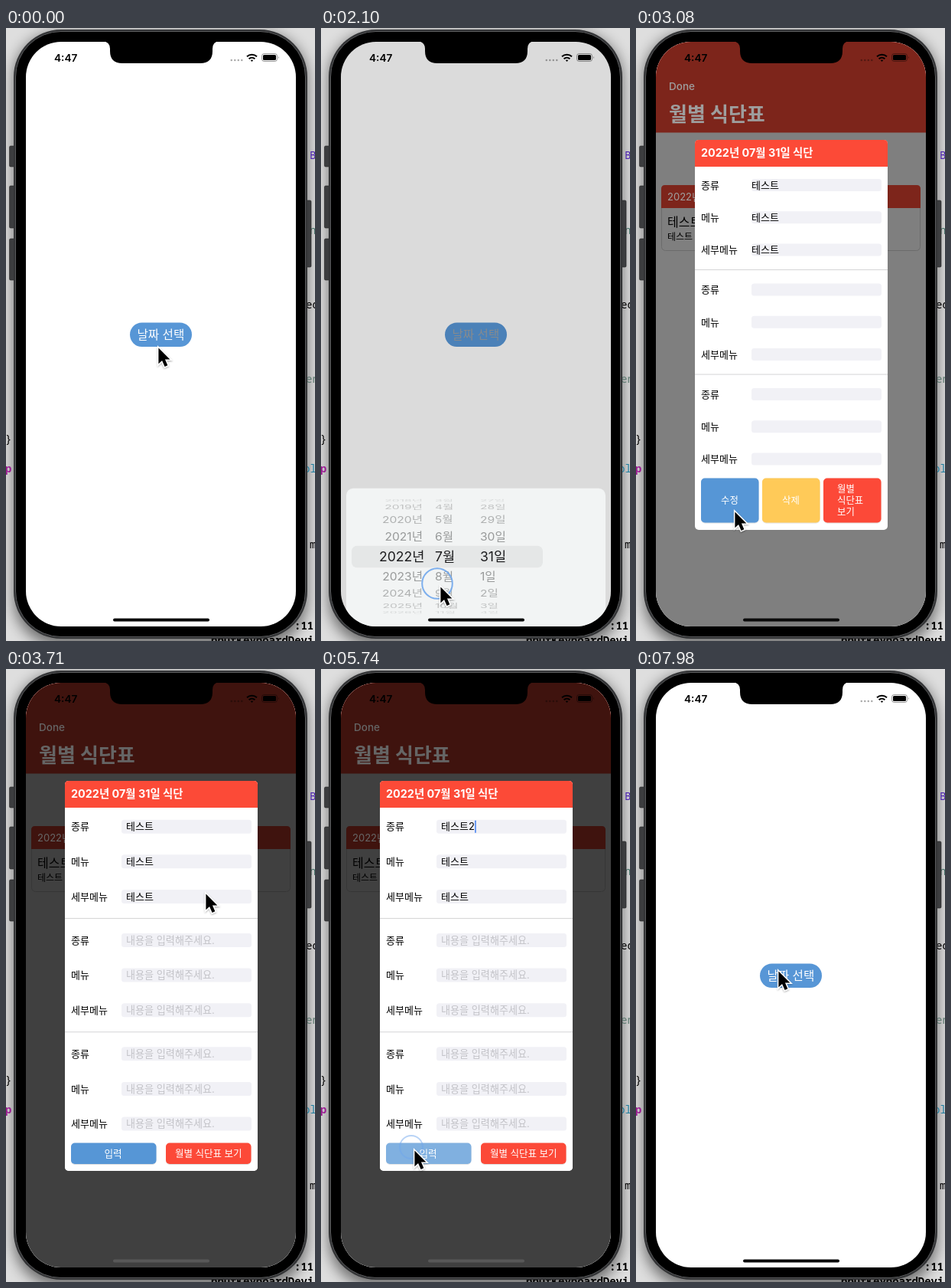
Recreate the animation shown at these times as an HTML page. Size 404 by 800 pixels, loop 8 s.

```html
<!DOCTYPE html>
<html lang="ko">
<head>
<meta charset="utf-8">
<style>
html, body { margin: 0; width: 100%; height: 100%; overflow: hidden; background: #dedede; }
svg { display: block; width: 404px; height: 800px; }
text { font-family: Inter, "Noto Sans CJK KR", "Noto Sans CJK JP", sans-serif; white-space: pre; }
.code text { font-family: "Noto Sans Mono", "DejaVu Sans Mono", monospace; font-size: 14px; }
.bold { font-weight: 700; }
.medium { font-weight: 500; }
.white { fill: #fff; }
.red { fill: #fc4a37; }
.blue { fill: #5796d6; }
.yellow { fill: #ffca58; }
.field { fill: #f1f1f6; }
.hint { fill: #c3c3c8; }
</style>
</head>
<body>
<svg viewBox="0 0 404 800">
  <defs>
    <filter id="blur" x="-20%" y="-20%" width="140%" height="140%"><feGaussianBlur stdDeviation="9"/></filter>
    <filter id="soft" x="-50%" y="-50%" width="200%" height="200%"><feDropShadow dx="0" dy="1.2" stdDeviation="1" flood-opacity=".35"/></filter>
    <filter id="lift" x="-10%" y="-20%" width="120%" height="140%"><feDropShadow dx="0" dy=".5" stdDeviation=".7" flood-opacity=".25"/></filter>
    <clipPath id="screenClip"><rect x="26" y="18" width="353" height="763" rx="46"/></clipPath>
  </defs>

  <rect width="404" height="800" fill="#dedede"/>
  <rect x="10" y="6" width="384" height="800" rx="60" fill="#000" opacity=".5" filter="url(#blur)"/>
  <g class="code">
    <text x="397" y="171" fill="#4b21b0">B</text>
    <text x="397" y="269" fill="#3f6e63">n</text>
    <text x="392" y="366">ed</text>
    <text x="392" y="463" fill="#5d7a70">en</text>
    <text x="389" y="580" fill="#1f7fa0">ol</text>
    <text x="397" y="679">m</text>
    <text x="-1" y="541">}</text>
    <text x="-1" y="580" class="bold" fill="#9b1f94">p:</text>
    <text x="377" y="785" class="bold">:11</text>
    <text x="268" y="804" class="bold">nputKeyboardDevi</text>
  </g>

  <g fill="#3c3d3f" stroke="#222" stroke-width=".6">
    <rect x="4.5" y="154" width="8" height="27" rx="1.5"/>
    <rect x="4.5" y="206" width="8" height="55" rx="1.5"/>
    <rect x="4.5" y="275" width="8" height="54" rx="1.5"/>
    <rect x="391" y="225" width="8" height="87" rx="1.5"/>
  </g>
  <rect x="10" y="2" width="384" height="795" rx="62" fill="#333436"/>
  <rect x="12.5" y="4.5" width="379" height="790" rx="59.5" fill="#000" stroke="#5a5b5d"/>

  <g clip-path="url(#screenClip)">
    <rect x="26" y="18" width="353" height="763" fill="#fff"/>
    <rect id="pick" x="162" y="384.5" width="81" height="31.5" rx="15.7"/>
    <text id="pickText" x="171.5" y="406" font-size="15.6">날짜 선택</text>
    <rect id="sheetDim" x="26" y="18" width="353" height="763"/>
    <g id="sheet"></g>
    <g id="page">
      <rect x="26" y="18" width="353" height="763" fill="#fff"/>
      <rect class="red" x="26" y="18" width="353" height="118.5"/>
      <rect x="33.5" y="205.5" width="338" height="85" rx="5" fill="#fff" stroke="#d8d8d8"/>
      <path class="red" d="M33 235V210q0-5 5-5H367q5 0 5 5V235Z"/>
      <text class="medium" x="41" y="259" font-size="16" id="cellTitle"></text>
      <text x="41" y="277" font-size="12">테스트</text>
    </g>
    <rect id="dim" x="26" y="18" width="353" height="763"/>
    <g id="titles">
      <text class="white medium" x="43" y="80.5" font-size="13.5">Done</text>
      <text class="white bold" x="43" y="122" font-size="26">월별 식단표</text>
      <text class="white" x="41" y="225" font-size="13">2022년 07월 31일</text>
    </g>

    <text x="63" y="43.5" font-size="13.6" font-weight="600">4:47</text>
    <g opacity=".33">
      <circle cx="294.8" cy="42" r="1.3"/><circle cx="299.3" cy="42" r="1.3"/>
      <circle cx="303.8" cy="42" r="1.3"/><circle cx="308.3" cy="42" r="1.3"/>
    </g>
    <g fill="none" stroke="#000" stroke-width="2">
      <path d="M315 37.2a9.5 9.5 0 0 1 13 0M317.6 40.2a5.7 5.7 0 0 1 7.8 0"/>
      <path d="M319.8 42 321.5 44 323.2 42Q321.5 40.8 319.8 42Z" fill="#000" stroke="none"/>
    </g>
    <rect x="334.5" y="33.5" width="20" height="10" rx="3" fill="none" stroke="#000" opacity=".4"/>
    <rect x="336" y="35" width="17" height="7" rx="1.6"/>
    <path d="M356 36.8q1.6 1.7 0 3.4Z" opacity=".5"/>
    <g id="detail"></g>
    <g id="edit"></g>
    <rect id="home" x="140" y="770.5" width="126" height="4" rx="2"/>
  </g>
  <path d="M126 17H279Q270 18 270 27V30Q270 46 254 46H152Q136 46 136 30V27Q136 18 126 17Z"/>

  <circle id="tap" fill="none" stroke="#6fa6ec" stroke-width="2"/>
  <g id="cursor">
    <path transform="translate(1.4 2.6) scale(.88)" d="M0 0V23.5L5.3 18.6 9.3 27.6 13.6 25.7 9.7 17H17Z" stroke="#fff" stroke-width="3.4" paint-order="stroke" filter="url(#soft)"/>
  </g>
</svg>

<script>
const LOOP = 8000, STEP = 70;
const el = id => document.getElementById(id);
const set = (id, attrs) => { for (const k in attrs) el(id).setAttribute(k, attrs[k]); };
const clamp = x => Math.min(1, Math.max(0, x));
const smooth = x => x * x * (3 - 2 * x);
const easeOut = x => 1 - (1 - x) ** 3;
const ramp = (t, from, to) => clamp((t - from) / (to - from));
const pulse = (t, a, b, c, d) => smooth(ramp(t, a, b)) * (1 - smooth(ramp(t, c, d)));
const mix = (a, b, p) => a + (b - a) * p;
const mixColor = (a, b, p) => `rgb(${a.map((v, i) => Math.round(mix(v, b[i], p)))})`;

const text = (x, y, size, s, attrs = '') => `<text x="${x}" y="${y}" font-size="${size}" ${attrs}>${s}</text>`;
const box = (x, y, w, h, r, attrs) => `<rect x="${x}" y="${y}" width="${w}" height="${h}" rx="${r}" ${attrs}/>`;

function buildWheel() {
  const offsets = [0, 26, 48, 64.5, 73], grays = ['#1c1c1e', '#989a9a', '#aeb0b0', '#c0c2c2', '#d6d8d8'];
  let out = box(33, 593, 339, 240, 9, 'fill="#f2f4f4"') + box(40, 668, 250, 28.5, 7, 'fill="#e5e7e7"');
  for (let i = -4; i <= 4; i++) {
    const n = Math.abs(i), size = n ? 15.6 : 17.6;
    const squash = Math.cos(n * Math.PI / 9.2);
    const y = 682.3 + Math.sign(i) * offsets[n], base = size * .36;
    const day = i > 0 ? i : 31 + i;
    out += `<g transform="translate(0 ${y}) scale(1 ${squash})" fill="${grays[n]}">`
      + text(n ? 133 : 135.5, base, size, `${2022 + i}년`, 'text-anchor="end"')
      + text(149, base, size, `${7 + i}월`) + text(208, base, size, `${day}일`) + '</g>';
  }
  return out;
}

function buildPopup({ first, row, group, fieldH, textX, hint, name }) {
  let out = box(77, 146, 252, 509, 5, 'fill="#fff"')
    + '<path class="red" d="M77 181V151q0-5 5-5H324q5 0 5 5V181Z"/>'
    + text(85, 168, 14.4, '2022년 07월 31일 식단', 'class="white bold"');
  for (let g = 0; g < 3; g++) {
    ['종류', '메뉴', '세부메뉴'].forEach((label, i) => {
      const y = first + g * group + i * row;
      out += text(85, y + 4.7, 13, label, 'class="medium"')
        + box(151, y - fieldH / 2, 170, fieldH, 3.5, 'class="field"');
      if (!g) out += text(textX, y + 4.7, 13, '테스트', i ? '' : `id="${name}"`);
      else if (hint) out += text(textX, y + 4.7, 13.1, hint, 'class="hint"');
    });
    if (g < 2) out += box(77, first + g * group + row * 2 + (group - row * 2) / 2 - .5, 252, 1, 0, 'fill="#d4d4d6"');
  }
  return out;
}

const button = (x, y, w, h, color) => box(x, y, w, h, 5, `class="${color}" filter="url(#lift)"`);

el('sheet').innerHTML = buildWheel();
el('detail').innerHTML = buildPopup({ first: 205, row: 42.3, group: 136.5, fieldH: 16, textX: 151, name: 'detailKind' })
  + button(85, 587.5, 75.5, 58, 'blue') + button(165, 587.5, 75.5, 58, 'yellow') + button(245, 587.5, 75.5, 58, 'red')
  + text(111, 621, 12.4, '수정', 'class="white"') + text(191, 621, 12.4, '삭제', 'class="white"')
  + ['월별', '식단표', '보기'].map((s, i) => text(263, 605.5 + i * 15.4, 12.4, s, 'class="white"')).join('');
el('edit').innerHTML = buildPopup({ first: 205.7, row: 45.6, group: 148.3, fieldH: 18, textX: 157, hint: '내용을 입력해주세요.', name: 'editKind' })
  + '<g id="save">' + button(85, 618.5, 111.5, 27.5, 'blue') + text(128.5, 637, 12.6, '입력', 'class="white"') + '</g>'
  + button(209, 618.5, 111.5, 27.5, 'red') + text(221, 637, 12.5, '월별 식단표 보기', 'class="white"')
  + box(201.2, 197.5, 1.5, 16.5, .7, 'fill="#3f7ff0" id="caret"');

// time, x, y of the pointer tip
const path = [
  [0, 198, 415], [500, 198, 415], [850, 195, 409], [1300, 195, 409], [1880, 155, 727],
  [2350, 155, 727], [2950, 128, 629], [3350, 128, 629], [3710, 260, 291], [4120, 212, 207],
  [4900, 212, 207], [5560, 121, 626], [5880, 121, 626], [6240, 281, 618], [6450, 281, 618],
  [6900, 60, 77], [7150, 60, 77], [7900, 185, 392], [8000, 185, 392]
];
const taps = [930, 1970, 3240, 4150, 5690, 6270, 6940];

function pointer(t) {
  const i = Math.max(1, path.findIndex(p => p[0] > t));
  const [a, b] = [path[i - 1], path[i]], p = smooth(ramp(t, a[0], b[0]));
  return [mix(a[1], b[1], p), mix(a[2], b[2], p)];
}

function draw(t) {
  const sheetIn = easeOut(ramp(t, 950, 1190)), sheetOut = smooth(ramp(t, 2057, 2410));
  set('sheet', { transform: `translate(0 ${190 * (1 - sheetIn + sheetOut)})` });
  set('sheetDim', { opacity: .14 * sheetIn * (1 - smooth(ramp(t, 2100, 2400))) });
  const gray = sheetIn * (1 - ramp(t, 2030, 2100)), grayText = sheetIn * (1 - ramp(t, 2040, 2320));
  set('pick', { fill: mixColor([87, 150, 214], [228, 231, 231], gray) });
  set('pickText', { fill: mixColor([255, 255, 255], [150, 155, 160], Math.min(1, grayText * 1.2)) });

  const pageIn = easeOut(ramp(t, 2380, 2700)), pageOut = smooth(ramp(t, 7000, 7350));
  const slide = `translate(0 ${765 * (1 - pageIn + pageOut)})`;
  const detail = pulse(t, 2680, 2880, 6320, 6520), edit = pulse(t, 3300, 3500, 5800, 5980);
  set('page', { transform: slide });
  set('titles', { transform: slide });
  el('titles').style.filter = `brightness(${(1 - .38 * detail) * (1 - .36 * edit)})`;
  set('dim', { opacity: 1 - (1 - .5 * detail) * (1 - .5 * edit) });
  set('detail', { opacity: detail });
  set('edit', { opacity: edit });
  set('home', { fill: mixColor([10, 10, 10], [88, 88, 88], edit) });

  const typed = t >= 4700 ? '테스트2' : '테스트', saved = t >= 5800 ? '테스트2' : '테스트';
  el('editKind').textContent = typed;
  el('detailKind').textContent = el('cellTitle').textContent = saved;
  set('caret', {
    x: t >= 4700 ? 201.2 : 193.5,
    opacity: t >= 4200 && (t - 4200) % 700 < 420 ? 1 : 0
  });
  set('save', { opacity: t >= 5660 && t < 5800 ? .75 : 1 });

  const [x, y] = pointer(t);
  set('cursor', { transform: `translate(${x} ${y})` });
  const age = t - (taps.findLast(s => s <= t) ?? -LOOP), p = clamp(age / 300);
  set('tap', { cx: x - 3, cy: y - 2, r: 12 + 18 * p, opacity: p < 1 ? Math.min(1, p * 3) * (1 - .6 * p * p) : 0 });
}

function tick() {
  const t = performance.now() % LOOP;
  draw(Math.floor(t / STEP) * STEP);
  requestAnimationFrame(tick);
}
tick();
</script>
</body>
</html>
```
